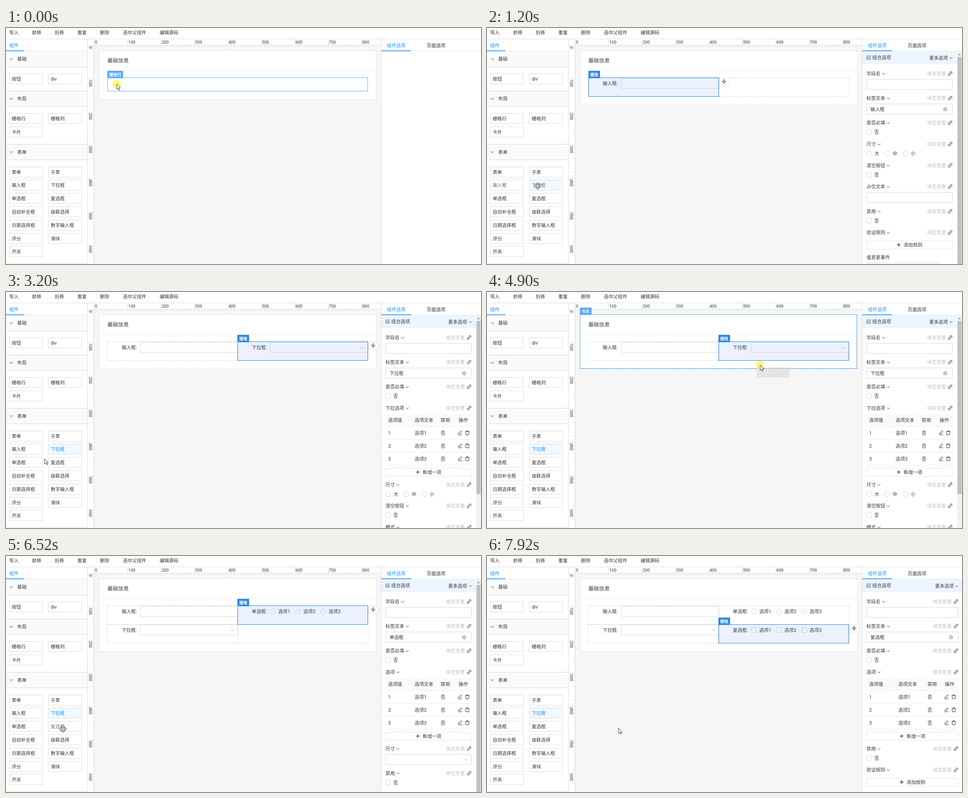
An HTML page that plays this animation: 1059 px wide and 529 px high, repeating every 8000 ms.

```html
<!DOCTYPE html>
<html lang="zh-CN">
<head>
<meta charset="utf-8">
<title>表单设计器</title>
<style>
html, body { margin: 0; width: 100%; height: 100%; overflow: hidden; background: #fff; }
svg { display: block; width: 1059px; height: 529px; }
text { font-family: Roboto, "Noto Sans CJK SC", "Noto Sans CJK", sans-serif; white-space: pre; }
.mono { font-family: "Noto Sans Mono", "DejaVu Sans Mono", monospace; }
</style>
</head>
<body>
<svg viewBox="0 0 1059 529"><g id="base"></g><g id="live"></g></svg>
<script>
const INK = '#333', BLUE = '#1890ff', LINE = '#dcdcdc', PALE = '#c0c0c0';
const SIZE = 10.43, UNIT = 0.745;

// ---- drawing helpers, all return markup ----
const text = (x, mid, str, fill = INK, size = SIZE, more = '') =>
  `<text x="${x}" y="${(mid + size * 0.375).toFixed(2)}" font-size="${size}" fill="${fill}" ${more}>${str}</text>`;
const fill = (x, y, w, h, color, more = '') =>
  `<rect x="${x}" y="${y}" width="${w}" height="${h}" fill="${color}" ${more}/>`;
const box = (x, y, w, h, stroke = LINE, color = '#fff', more = '') =>
  `<rect x="${x + .5}" y="${y + .5}" width="${w - 1}" height="${h - 1}" fill="${color}" stroke="${stroke}" ${more}/>`;
const path = (d, stroke = INK, more = '') =>
  `<path d="${d}" fill="none" stroke="${stroke}" ${more}/>`;
const at = (x, y, body) => `<g transform="translate(${x} ${y})">${body}</g>`;
const ring = (x, y) => `<circle cx="${x}" cy="${y}" r="5.6" fill="#fff" stroke="#d4d4d4"/>`;
const check = (x, y) => box(x - 6, y - 6, 12, 12, '#d4d4d4', '#fff', 'rx="1.5"');
const chevron = (x, y, color = INK, s = 3) =>
  path(`M${x - s} ${y - s / 2}l${s} ${s}l${s} ${-s}`, color);
const plus = (x, y, r = 4) => path(`M${x - r} ${y}h${2 * r}M${x} ${y - r}v${2 * r}`, INK, 'stroke-width="1.4"');
const dashed = (x, y, w, h, color = 'none') =>
  box(x, y, w, h, '#d2d2d2', color, 'stroke-dasharray="3 2"');

const link = (x, y) => at(x, y, `<g transform="rotate(-45)">${
  path('M-1 -2h-2a2 2 0 0 0 0 4h2M1 -2h2a2 2 0 0 1 0 4h-2M-2 0h4')}</g>`);
const pen = (x, y) => at(x, y, path('M-4.5 4.5h9M-3.5 2.5l.5-2.5l5-4.5l2 2l-5 4.5z'));
const bin = (x, y) => at(x, y, path('M-4.5 -3h9M-1.5 -3v-1.5h3v1.5M-3.3 -3v7.5h6.6v-7.5'));
const listIcon = y => path(`M846.5 ${y - 3.5}h9.5M850 ${y}h6M846.5 ${y + 3.5}h9.5`) +
  `<path d="M846 ${y - 2}l3 2l-3 2z" fill="${INK}"/>`;

// ---- palette of components ----
const groups = [
  ['基础', 52, ['按钮', 'div']],
  ['布局', 141, ['栅格行', '栅格列', '卡片']],
  ['表单', 260.5, ['表单', '子表', '输入框', '下拉框', '单选框', '复选框', '自动补全框',
    '级联选择', '日期选择框', '数字输入框', '评分', '滑块', '开关']]
];
const slots = {};
for (const [, top, names] of groups)
  names.forEach((name, i) => {
    if (!slots[name]) slots[name] = [7 + i % 2 * 87, Math.round(top + 50 + (i >> 1) * 29.8)];
  });
// the first entry of the form group shares its caption with the group title only
const button = (name, color = INK, bg = '#fff') => {
  const [x, y] = slots[name];
  return box(x, y, 75, 24, LINE, bg) + text(x + 5.7, y + 12.2, name, color);
};

function ruler() {
  let s = '';
  for (let i = 0; i <= 85; i++) {
    const x = 197 + i * 10 * UNIT, long = i % 10 === 0;
    s += path(`M${x} ${long ? 26 : 36}V39.5`, '#c4c4c4', 'stroke-width=".8"');
    if (long) s += text(x + 1.3, 32, i * 10, INK, 9.3);
  }
  for (let i = 0; i <= 65; i++) {
    const y = 40 + i * 10 * UNIT, long = i % 10 === 0;
    s += path(`M${long ? 183 : 193} ${y}H196.5`, '#c4c4c4', 'stroke-width=".8"');
    if (long) s += `<g transform="translate(188.5 ${y + 1.3}) rotate(90)">${text(0, 0, i * 10, INK, 9.3)}</g>`;
  }
  return s + path('M182 39.5H836M196.5 25V529', '#dedede');
}

function base() {
  let s = fill(0, 0, 1059, 529, '#fff') + fill(197, 40, 639, 489, '#f6f6f6');
  const menu = [[7, '导入'], [58, '前移'], [108.5, '后移'], [159, '重复'], [209.5, '删除'],
    [260.5, '选中父组件'], [342.5, '编辑源码']];
  for (const [x, name] of menu) s += text(x, 10.5, name);
  s += ruler();
  s += path('M0 24.5H1059', '#dedede') + path('M181.5 25V529M836.5 25V529', '#dedede');
  s += path('M0 51.5H181M837 51.5H1059', '#e8e8e8');
  s += text(7, 38.8, '组件', BLUE) + fill(0, 50.3, 41, 1.6, BLUE);
  s += text(849, 38.8, '组件选项', BLUE) + fill(837, 50.3, 66, 1.6, BLUE) + text(938, 38.8, '页面选项');
  for (const [name, top, items] of groups) {
    s += fill(0, top, 181, 35.5, '#fafafa') + path(`M0 ${Math.floor(top + 35) + .5}H181`, '#d6d6d6');
    if (top > 60) s += path(`M0 ${Math.floor(top) + .5}H181`, '#d6d6d6');
    s += chevron(12, top + 17.5, INK, 3.6) + text(25, top + 17.5, name);
    s += items.map(n => button(n)).join('');
  }
  return s + path('M0 528.5H181', '#d6d6d6');
}

// ---- property panel ----
const head = (y, name, right) =>
  fill(837, y, right - 837, 29, '#ecf5ff') + listIcon(y + 14.5) + text(859, y + 14.5, name);
const input = (y, R, value = '') => box(846, y + 12.5, R - 846, 24, '#d6d6d6', '#fff', 'rx="1.5"') +
  text(855, y + 24.7, value);
const select = (y, R, value) => input(y, R, value) + chevron(R - 13, y + 25, '#bbb', 3.8);
const clear = (x, y) => `<circle cx="${x}" cy="${y}" r="4.6" fill="#bdbdbd"/>` +
  path(`M${x - 1.6} ${y - 1.6}l3.2 3.2m0 -3.2l-3.2 3.2`, '#fff');
const wide = (y, R, label) => dashed(846, y - 9, R - 846, 19, '#fff') +
  plus((R + 846) / 2 - 24, y) + text((R + 846) / 2 - 13, y, label);
const label = (y, name, R) => text(846, y, name) + chevron(853 + name.length * SIZE, y + .5) +
  text(R - 56.5, y, '绑定变量', PALE) + link(R - 5.5, y);

function table(y, R) {
  const cols = R > 1040 ? [852, 917, 982, 1021] : [852, 911, 969, 1009];
  let s = fill(846, y + 13, R - 846, 28.5, '#fafafa');
  ['选项值', '选项文本', '禁用', '操作'].forEach((n, i) => s += text(cols[i], y + 26.5, n));
  s += path(`M846 ${y + 41.5}H${R}`, '#ececec');
  for (let i = 1; i < 4; i++) {
    const m = y + 26.5 + i * 29;
    s += text(cols[0], m, i) + text(cols[1], m, '选项' + i) + text(cols[2], m, '否') +
      pen(cols[3] + 3.5, m) + bin(cols[3] + 19.5, m) + path(`M846 ${m + 14.5}H${R}`, '#ececec');
  }
  return s + wide(y + 143.5, R, '新增一项');
}

const kinds = {
  in: [55.2, (y, R, v) => input(y, R, v) + (v ? clear(R - 16.5, y + 25) : '')],
  select: [55.2, select],
  check: [47.7, y => check(852, y + 21) + text(863.5, y + 21, '否')],
  radio: [47.7, y => ['大', '中', '小'].map((n, i) => ring(852 + i * 40.2, y + 21.5) + text(864 + i * 40.2, y + 21.3, n)).join('')],
  table: [171.5, table],
  rule: [55.2, (y, R) => wide(y + 27.5, R, '添加规则')]
};
const common = title => [['字段名', 'in'], ['标签文本', 'in', title], ['是否必填', 'check']];
const forms = {
  input: [...common('输入框'), ['尺寸', 'radio'], ['清空按钮', 'check'], ['占位文本', 'in'],
    ['禁用', 'check'], ['验证规则', 'rule'], ['值变更事件']],
  select: [...common('下拉框'), ['下拉选项', 'table'], ['尺寸', 'radio'], ['清空按钮', 'check'], ['模式', 'check']],
  radio: [...common('单选框'), ['选项', 'table'], ['尺寸', 'select'], ['禁用', 'check'], ['验证规则', 'rule']],
  check: [...common('复选框'), ['选项', 'table'], ['禁用', 'check'], ['验证规则', 'rule']]
};

function formPanel(name) {
  const scroll = name !== 'check', R = scroll ? 1038 : 1051;
  let y = 102, s = head(52, '组合选项', scroll ? 1048 : 1059) +
    text(R - 52, 66.8, '更多选项') + chevron(R - 3.3, 67.5);
  for (const [title, kind, value] of forms[name]) {
    if (!kind) {
      s += text(846, y, title) + box(846, y + 12.5, 163, 24, '#d6d6d6');
      break;
    }
    const [step, draw] = kinds[kind];
    s += label(y, title, R) + draw(y, R, value);
    y += step;
  }
  if (scroll) s += fill(1048, 52, 11, 477, '#f1f1f1') + fill(1049, 65, 9, name === 'select' ? 388 : 464, '#c1c1c1') +
    '<path d="M1050 61l3.2 -4l3.2 4z" fill="#a0a0a0"/>';
  return s;
}

function rowPanel() {
  const R = 1051, toggle = y => fill(1030, y - 6, 21, 12, '#bfbfbf', 'rx="6"') +
    `<circle cx="1036" cy="${y}" r="4.8" fill="#fff"/>`;
  let s = head(52, '选项', 1059) + label(102, '间距', R) + input(102, R) +
    label(157.2, '垂直对齐', R) + select(157.2, R, 'default') +
    label(212.4, '水平排列', R) + select(212.4, R, '');
  s += head(264, '事件', 1059) + fill(837, 293, 222, 28, '#fafafa') + path('M837 321.5H1059', '#ececec') +
    text(843, 306.5, '事件名称') + text(903, 306.5, '事件内容') + plus(1039.5, 306.5) +
    text(927, 336, '暂无数据', PALE);
  s += head(363, '样式', 1059) + text(846, 409, '内联样式 {') + text(846, 426, '}');
  s += head(443, '指令', 1059);
  for (const [y, name] of [[491.5, 'v-show'], [515.5, 'v-if']])
    s += text(847, y - .5, name, '#d2695c', 10, 'class="mono"') + toggle(y);
  return s;
}

// ---- canvas ----
const field = (x, y, name) => text(x + 32, y, name + ':') + box(x + 72.5, y - 12, 218.5, 24, '#d9d9d9', '#fff', 'rx="1.5"');
const options = (y, name, mark) => text(548, y, name + ':') +
  [1, 2, 3].map(i => mark(539 + i * 56.2, y + .3) + text(550.7 + i * 56.2, y, '选项' + i)).join('');

function card(count) {
  const bottom = [161, 173, 173, 215, 215][count];
  let s = dashed(207, 50, 619, bottom - 50, '#fff') + text(226, 73, '基础信息', INK, 11.92) + path('M208 94.5H825', '#ececec');
  if (!count) return s;
  s += dashed(225, 111, 583, 43) + path('M517.5 111V154', '#d2d2d2', 'stroke-dasharray="3 2"');
  s += field(226, 124, '输入框');
  if (count === 2) s += field(516, 124, '下拉框') + chevron(794, 124.5, '#bbb', 3.8);
  if (count > 2) s += dashed(225, 153, 583, 43) + path('M517.5 154V195', '#d2d2d2', 'stroke-dasharray="3 2"') +
    options(124, '单选框', ring) + field(226, 165.7, '下拉框') + chevron(504.5, 166.5, '#bbb', 3.8);
  if (count > 3) s += options(165.7, '复选框', check);
  return s;
}

const areas = {
  row: [226, 111, 581, 31, '栅格行'],
  a: [226, 111, 291, 43, '栅格'],
  b: [516, 111, 291, 43, '栅格'],
  d: [516, 153, 291, 43, '栅格'],
  card: [207, 50, 618, 122, '卡片']
};
function outline(key, color, tint) {
  const [x, y, w, h, name] = areas[key];
  return box(x, y, w, h, color, tint) + fill(x, y - 15, name.length * 9 + 8, 16.5, color, 'rx="1"') +
    text(x + 4, y - 6.7, name, '#fff', 9, 'font-weight="600"');
}
function handle(key) {
  const [x, y, w] = areas[key], cx = x + w + 11.5;
  return box(x + w + 1, y, 22, 18, '#e2e2e2') + at(cx, y + 9,
    path('M-4.5 0h9M0 -4.5v9M-3 -1.5l-1.5 1.5l1.5 1.5M3 -1.5l1.5 1.5l-1.5 1.5M-1.5 -3l1.5 -1.5l1.5 1.5M-1.5 3l1.5 1.5l1.5 -1.5'));
}

// ---- pointer ----
const arm = [[-1.3, -1.3], [-1.3, -4.5], [-3.5, -4.5], [0, -8.2], [3.5, -4.5], [1.3, -4.5]];
const cross = [0, 1, 2, 3].flatMap(q => arm.map(([x, y]) =>
  [[x, y], [-y, x], [-x, -y], [y, -x]][q].join())).join(' ');
const shapes = {
  arrow: '<path d="M0 0V11.5L2.7 9.1L4.8 13.4L6.6 12.5L4.7 8.4H8.3Z" fill="#fff" stroke="#222" stroke-width=".9"/>',
  move: `<polygon points="${cross}" fill="#fff" stroke="#222" stroke-width=".9"/>`
};
const pointer = ([kind, x, y, glow]) => at(x, y,
  (glow ? `<circle r="${kind === 'move' ? 8.5 : 9.7}" fill="#fff23c" fill-opacity=".68"/>` : '') + shapes[kind]);

// ---- timeline: each step keeps what it does not change ----
const SOFT = '#52adf5', FADE = '#777';
const steps = [
  [0, { count: 0, panel: '', sel: '', hover: 'row', tool: 0, hot: '', tint: {}, ghost: null, cur: ['arrow', 247, 126, 1] }],
  [200, { panel: 'row', sel: 'row', tool: 1 }],
  [700, { hover: '', hot: '输入框', tint: { 输入框: SOFT }, cur: ['move', 53, 355, 1] }],
  [1200, { count: 1, panel: 'input', sel: 'a', hot: '下拉框', tint: { 输入框: '#4d6f8c', 下拉框: FADE }, cur: ['move', 113, 354] }],
  [1700, { tint: { 输入框: '#4d6f8c', 下拉框: '#64a5da' }, cur: ['move', 131, 354] }],
  [2200, { tint: { 下拉框: SOFT } }],
  [3200, { count: 2, panel: 'select', sel: 'b', tint: { 下拉框: BLUE }, cur: ['arrow', 86, 374] }],
  [3700, { tint: { 下拉框: BLUE, 单选框: FADE }, cur: ['move', 55, 384] }],
  [4200, { cur: ['move', 55, 384, 1] }],
  [4700, { tint: { 下拉框: BLUE }, tool: 0, ghost: [372, 245], cur: ['arrow', 380, 240, 1] }],
  [4900, { hover: 'card', ghost: [601, 169], cur: ['arrow', 609, 164, 1] }],
  [5120, { hover: '', ghost: [612, 142], cur: ['arrow', 620, 137, 1] }],
  [5320, { count: 3, panel: 'radio', ghost: null, cur: ['arrow', 620, 137] }],
  [5520, { tool: 1, cur: ['arrow', 600, 180] }],
  [5720, { cur: ['arrow', 520, 250] }],
  [5920, { cur: ['arrow', 360, 345] }],
  [6120, { cur: ['arrow', 215, 400] }],
  [6320, { tint: { 下拉框: BLUE, 复选框: FADE }, cur: ['move', 127, 388] }],
  [6720, { cur: ['move', 127, 388, 1] }],
  [6920, { tint: { 下拉框: BLUE }, tool: 0, ghost: [272, 355], cur: ['arrow', 280, 350, 1] }],
  [7120, { ghost: [533, 227], cur: ['arrow', 541, 222, 1] }],
  [7320, { hover: 'd', ghost: [582, 180], cur: ['arrow', 590, 175, 1] }],
  [7520, { count: 4, panel: 'check', sel: 'd', hover: '', ghost: null, tool: 1, cur: ['arrow', 590, 175] }],
  [7720, { cur: ['arrow', 440, 285] }],
  [7920, { cur: ['arrow', 293, 386] }]
];

function scene(s) {
  let out = '';
  for (const name of new Set([s.hot, ...Object.keys(s.tint)]))
    if (name) out += button(name, s.tint[name], name === s.hot ? '#f0f9ff' : '#fff');
  out += card(s.count);
  if (s.panel) out += s.panel === 'row' ? rowPanel() : formPanel(s.panel);
  if (s.sel) out += outline(s.sel, '#2f86e0', 'rgba(60,120,245,.1)');
  if (s.tool) out += handle(s.sel);
  if (s.hover) out += outline(s.hover, '#5aaaf8', 'none');
  if (s.ghost) out += fill(...s.ghost, 74, 23, '#d8d8d8', 'fill-opacity=".55"');
  return out + pointer(s.cur);
}

let state = {};
const views = steps.map(([time, change]) => [time, scene(state = { ...state, ...change })]);
const live = document.getElementById('live');
document.getElementById('base').innerHTML = base();

let shown = -1;
const start = performance.now();
function tick(now) {
  const t = Math.max(0, now - start) % 8000;
  const i = views.findLastIndex(v => v[0] <= t);
  if (i !== shown) live.innerHTML = views[shown = i][1];
  requestAnimationFrame(tick);
}
tick(start);
</script>
</body>
</html>
```
